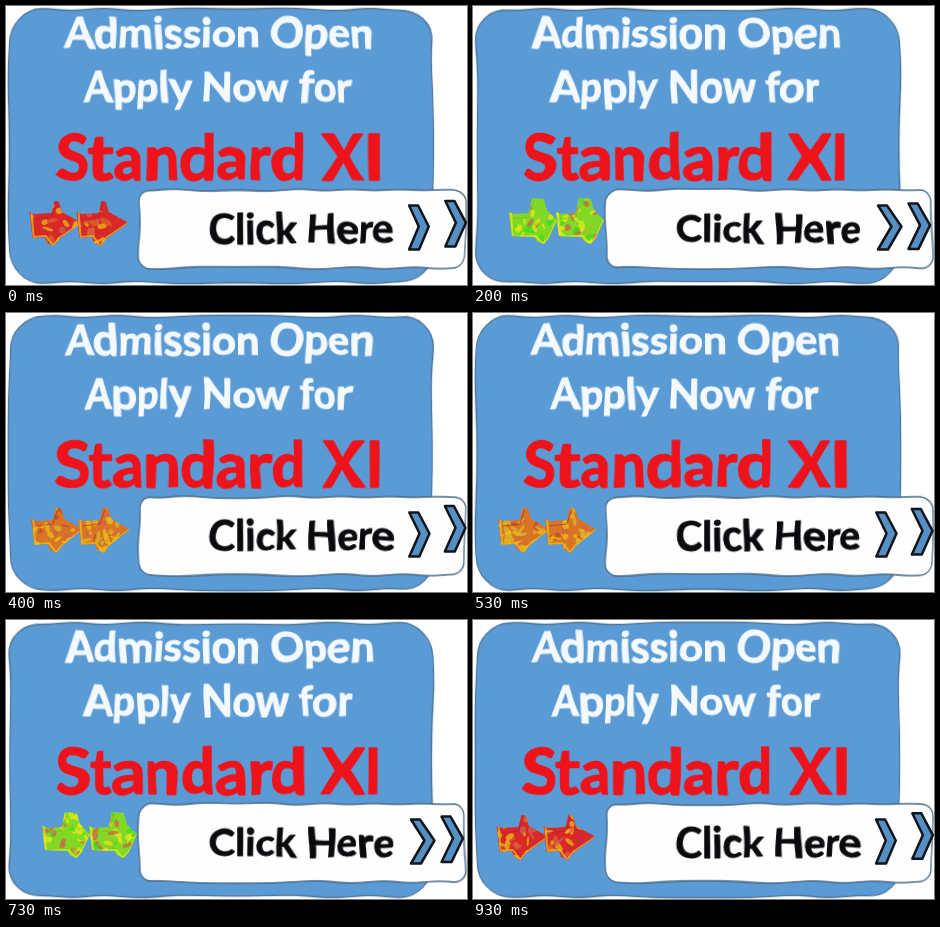
Recreate the animation shown at these times as an HTML page with a canvas. Size 461 by 279 pixels, loop 990 ms.

```html
<!DOCTYPE html>
<html lang="en">
<head>
<meta charset="utf-8">
<title>Admission Open</title>
<style>
html, body { margin: 0; width: 100%; height: 100%; overflow: hidden; background: #fff; }
canvas { display: block; }
</style>
</head>
<body>
<canvas id="stage" width="461" height="279"></canvas>
<script>
const W = 461, H = 279, LOOP = 990, TAU = Math.PI * 2;
const ctx = document.getElementById('stage').getContext('2d');

function seededRandom(seed) {
  return () => (seed = (seed * 16807) % 2147483647) / 2147483647;
}

function polygon(c, points) {
  c.beginPath();
  points.forEach(([x, y]) => c.lineTo(x, y));
  c.closePath();
}

function panel(c, x, y, w, h, radius, fill, stroke) {
  c.beginPath();
  c.roundRect(x, y, w, h, radius);
  c.fillStyle = fill;
  c.fill();
  c.strokeStyle = stroke;
  c.lineWidth = 1.3;
  c.stroke();
}

function label(c, text, x, baseline, size, color, weight) {
  c.font = `bold ${size}px Lato, "Open Sans", sans-serif`;
  c.fillStyle = c.strokeStyle = color;
  c.lineWidth = weight;
  c.lineJoin = 'round';
  c.fillText(text, x, baseline);
  c.strokeText(text, x, baseline);
}

function paintBanner() {
  const canvas = document.createElement('canvas');
  canvas.width = W;
  canvas.height = H;
  const c = canvas.getContext('2d');
  c.fillStyle = '#fff';
  c.fillRect(0, 0, W, H);
  panel(c, 3.5, 3.5, 423, 273, 32, '#5b9bd5', '#4b7599');
  panel(c, 133, 184, 326, 78, 12, '#fefefe', '#486a88');
  label(c, 'Admission Open', 59, 41.5, 42.2, '#f4f9fd', 1.1);
  label(c, 'Apply Now for', 78, 95.5, 41.2, '#f4f9fd', 1.1);
  label(c, 'Standard XI', 49.5, 174, 63.2, '#ee131b', 1.6);
  label(c, 'Click Here', 202.5, 237, 40.3, '#0b0b0f', 0.9);
  return c.getImageData(0, 0, W, H).data;
}

const banner = paintBanner();
const rippled = ctx.createImageData(W, H);

// Rings travel outwards from the middle and push pixels along the radius.
function drawRippled(phase) {
  const clamp = (v, max) => Math.min(Math.max(v, 0), max - 1.001);
  const out = rippled.data;
  for (let y = 0, o = 0; y < H; y++) {
    for (let x = 0; x < W; x++, o += 4) {
      const rx = x - 230, ry = y - 140, r = Math.hypot(rx, ry) || 1;
      const push = 1.3 * Math.sin((r - 212) * TAU / 46 - TAU / 4 - phase) / r;
      const sx = clamp(x - rx * push, W), sy = clamp(y - ry * push, H);
      const ix = Math.floor(sx), iy = Math.floor(sy);
      const fx = sx - ix, fy = sy - iy, i = (iy * W + ix) * 4;
      for (let k = i, q = o; k < i + 4; k++, q++) {
        const upper = banner[k] * (1 - fx) + banner[k + 4] * fx;
        const lower = banner[k + W * 4] * (1 - fx) + banner[k + W * 4 + 4] * fx;
        out[q] = upper * (1 - fy) + lower * fy;
      }
    }
  }
  ctx.putImageData(rippled, 0, 0);
}

function drawChevron(left, tip, top, bottom) {
  const middle = (top + bottom) / 2 - 1;
  polygon(ctx, [[left, top], [left + 9, top], [tip, middle],
    [left + 10, bottom], [left, bottom], [tip - 10, middle]]);
  ctx.fillStyle = '#568fc4';
  ctx.fill();
  ctx.strokeStyle = '#10151c';
  ctx.lineWidth = 2.5;
  ctx.lineJoin = 'round';
  ctx.stroke();
}

function drawArrow(left, tip, swing, random) {
  const neck = tip - 27 + 2 * swing;
  const foot = tip - 31 + 15 * swing;
  const top = 195 - 3 * swing;
  const bottom = 240 - 2 * swing;
  const shoulder = neck + 4 + 8 * swing;
  const nose = 217 - 3 * swing;
  const hue = -35 + 125 * swing ** 0.4;
  const gold = `hsl(${46 + 14 * swing} 82% 50%)`;

  ctx.save();
  polygon(ctx, [[left, 206], [left + 5, 208], [neck - 3, 207], [neck, top],
    [shoulder, top + 1], [shoulder + 3, 206 - 2 * swing], [tip, nose],
    [foot + 8, 233 - swing], [foot + 3, bottom], [foot - 4, bottom - 3],
    [foot - 6, 231], [left + 3, 232 - 2 * swing]]);
  ctx.fillStyle = `hsl(${hue} 70% 50%)`;
  ctx.fill();
  ctx.clip();

  const tones = [gold, gold, `hsl(${hue + 22} 72% 50%)`,
    `hsl(${hue - 14} 66% 47%)`, '#d0604c'];
  ctx.globalAlpha = 0.75;
  for (let i = 0; i < 44; i++) {
    ctx.beginPath();
    ctx.ellipse(left + random() * (tip - left), top + random() * (bottom - top),
      2 + random() * 4, 1 + random() * 2.2, random() * 3, 0, TAU);
    ctx.fillStyle = tones[Math.floor(random() * tones.length)];
    ctx.fill();
  }

  // Bright rims and the fold between the faces.
  ctx.strokeStyle = gold;
  ctx.lineWidth = 2;
  ctx.beginPath();
  ctx.moveTo(left + 2, 206);
  ctx.lineTo(left + 4, 231);
  ctx.lineTo(foot - 5, 230);
  ctx.lineTo(foot + 2, bottom);
  ctx.lineTo(foot + 8, 232);
  ctx.lineTo(tip, nose);
  ctx.stroke();
  ctx.strokeStyle = `hsl(${hue - 14} 70% 42%)`;
  ctx.lineWidth = 1.2;
  ctx.beginPath();
  ctx.moveTo(left + 4, 213);
  ctx.lineTo(neck - 3, 211);
  ctx.lineTo(neck + 2, top + 2);
  ctx.stroke();
  ctx.restore();
}

function drawStep(step) {
  const phase = (step + 0.5) * TAU / 7.5;
  const wave = Math.cos(phase);
  const sway = Math.sin(phase);
  const swing = (1 - wave) / 2;
  const random = seededRandom(971 + step * 7919);
  drawRippled(phase);

  const left = 29.5 - 6.5 * wave;
  const tip = 126.5 - 4.5 * wave;
  drawArrow(left, tip - 47, swing, random);
  drawArrow(left + 47, tip, swing, random);

  drawChevron(404 - wave, 425.5 - 3 * wave, 199.5, 243.5);
  const lift = 2 * sway - 1.5 * wave;
  drawChevron(437.5 + 2 * wave, 458.5 + 1.5 * wave, 195.5 + lift, 241 + lift);
}

let shown = -1;
function tick(now) {
  const time = (now - start) % LOOP;
  let step = 14;
  while (step > 0 && Math.round(step * 20 / 3) * 10 > time) step--;
  if (step !== shown) drawStep(shown = step);
  requestAnimationFrame(tick);
}

const start = performance.now();
drawStep(shown = 0);
requestAnimationFrame(now => tick(Math.max(now, start)));
</script>
</body>
</html>
```
